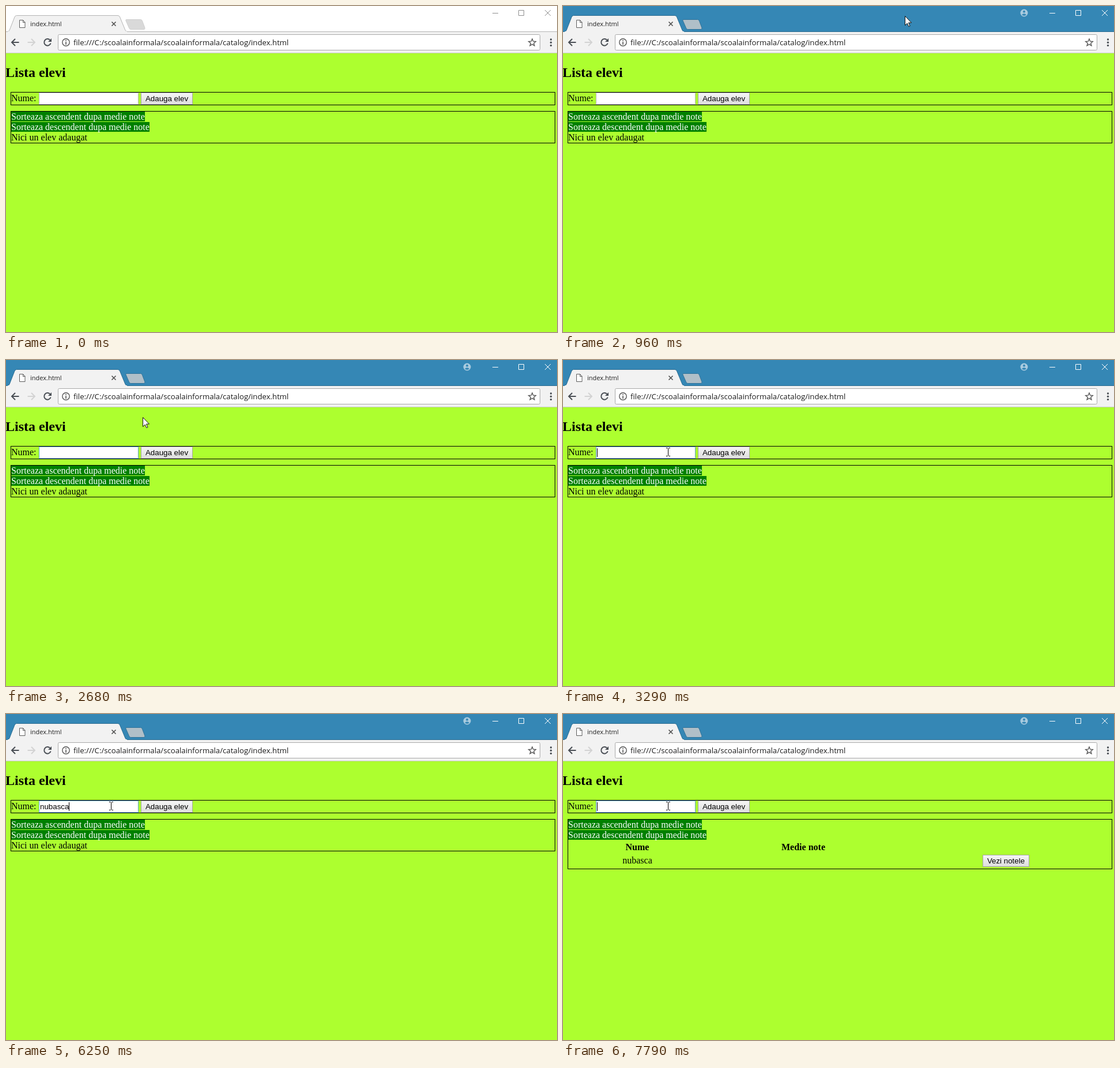
Recreate the animation shown at these times as an HTML page. Size 956 by 565 pixels, loop 8 s.

```html
<!DOCTYPE html>
<html lang="ro">
<head>
<meta charset="utf-8">
<title>Lista elevi</title>
<style>
  html, body { margin: 0; width: 100%; height: 100%; overflow: hidden; background: #adff2f; }
  svg { display: block; width: 956px; height: 565px; }
  text { white-space: pre; }
  .ui { font-family: "Open Sans", "Noto Sans", sans-serif; }
  .page { font: 16px "Liberation Serif", "Times New Roman", serif; }
  .form { font: 13.333px "Liberation Sans", Arial, sans-serif; }
  .mid { text-anchor: middle; }
  .bold { font-weight: bold; }
  .line { fill: none; stroke: #000; }
  .icon { fill: none; stroke: #4a4f55; stroke-width: 2; }
  .bar { fill: #fff; }
  .edge { stroke: #b4b4b4; }
  .plus { fill: #d9d9d9; stroke: #cfcfcf; }
  .win { fill: none; stroke: #8e8e8e; }
  .user { display: none; }
  .active .bar { fill: #3587b5; }
  .active .edge { stroke: #2b6c91; }
  .active .plus { fill: #b0bfc8; stroke: #2f7299; }
  .active .win { stroke: #fff; }
  .active .user { display: inline; }
</style>
</head>
<body>
<svg viewBox="0 0 956 565" xmlns="http://www.w3.org/2000/svg">
  <defs>
    <linearGradient id="face" x2="0" y2="1">
      <stop stop-color="#f6f6f6"/><stop offset="1" stop-color="#dddddd"/>
    </linearGradient>
  </defs>
  <rect width="956" height="565" fill="#adff2f"/>

  <g id="frame">
    <rect class="bar" width="956" height="45"/>
    <rect y="45" width="956" height="37" fill="#f2f2f2"/>
    <path class="edge" d="M0 44.5H956"/>
    <path class="edge" fill="#f2f2f2" d="M2 44.5Q5 44.5 6 42L15 19Q16 16.5 18.500 16.500H194Q196.500 16.500 197.500 19L207 42Q208 44.500 211 44.500"/>
    <path d="M3 44.5H210" stroke="#f2f2f2"/>
    <path class="plus" d="M209 23.500H233.500Q235.500 23.500 236.300 25.500L241 38Q241.500 40.500 239 40.500H216.500Q214.500 40.500 213.700 38.500L208 25.500Q207.200 23.500 209 23.500Z"/>
    <path class="win" d="M844 12.5H854M889.500 7.500H898.500V16.500H889.500ZM935 7L945 17M945 7L935 17"/>
    <g class="user">
      <circle cx="800" cy="12" r="6.500" fill="#a9cbdf"/>
      <circle cx="800" cy="9.700" r="2" fill="#3587b5"/>
      <path d="M796 15.200Q800 11.200 804 15.200Q800 18.600 796 15.200Z" fill="#3587b5"/>
    </g>
  </g>

  <path id="favicon" d="M23.500 24.500H29.500L33 28V37.500H23.500ZM29.500 24.500V28.500H33" fill="#fff" stroke="#5c5c5c"/>
  <text class="ui" x="42" y="35" font-size="11" fill="#222">index.html</text>
  <path d="M183.500 27.500L190.500 34.500M190.500 27.500L183.500 34.500" stroke="#505050" stroke-width="1.600"/>

  <path d="M0 81.500H956" stroke="#c6ccbd"/>
  <path class="icon" d="M22.500 63H10.500M16 57L10 63L16 69"/>
  <path class="icon" style="stroke:#d3d3d3" d="M37.500 63H49.500M44 57L50 63L44 69"/>
  <g id="reload">
    <path class="icon" d="M76.300 58.900A5.800 5.800 0 1 0 77.600 64.500"/>
    <path d="M79 56V62H73Z" fill="#4a4f55"/>
  </g>
  <path id="stop" class="icon" d="M66.500 57.500L77.500 68.500M77.500 57.500L66.500 68.500"/>
  <rect x="90.500" y="49.500" width="836" height="27" rx="2" fill="#fff" stroke="#a9a9a9"/>
  <circle cx="104" cy="63" r="6.200" fill="none" stroke="#555" stroke-width="1.400"/>
  <path d="M104 62V67M104 59V60.700" stroke="#555" stroke-width="1.600"/>
  <text class="ui" x="117" y="68" font-size="13.200" fill="#1c1c1c">file:///C:/scoalainformala/scoalainformala/catalog/index.html</text>
  <path d="M913 57L914.700 61.200L919.200 61.500L915.700 64.400L916.900 68.800L913 66.400L909.100 68.800L910.300 64.400L906.800 61.500L911.300 61.200Z" fill="none" stroke="#555" stroke-width="1.400"/>
  <g fill="#4a4f55">
    <circle cx="945.500" cy="58" r="1.700"/><circle cx="945.500" cy="63.200" r="1.700"/><circle cx="945.500" cy="68.400" r="1.700"/>
  </g>

  <g class="page">
    <text class="bold" x="-1" y="123" font-size="24">Lista elevi</text>
    <rect class="line" x="8.500" y="149.500" width="944" height="22"/>
    <text x="9" y="165">Nume:</text>
    <rect id="panel" class="line" x="8.500" y="182.500" width="944" height="55"/>
    <path d="M9 183H241V200H9ZM9 201H249V218H9Z" fill="#008000"/>
    <text x="9" y="197" fill="#fff">Sorteaza ascendent dupa medie note</text>
    <text x="9" y="215" fill="#fff">Sorteaza descendent dupa medie note</text>
    <text id="empty" x="9" y="233">Nici un elev adaugat</text>
    <g id="table" class="mid">
      <text class="bold" x="129" y="236">Nume</text>
      <text class="bold" x="417" y="236">Medie note</text>
      <text id="pupil" x="129" y="259"></text>
      <g class="form">
        <rect x="728.500" y="244.500" width="80" height="20" fill="url(#face)" stroke="#a5a5a5"/>
        <text x="768.500" y="259">Vezi notele</text>
      </g>
    </g>
  </g>

  <g class="form">
    <rect id="field" x="57.500" y="150.500" width="172" height="20" fill="#fff"/>
    <text id="typed" x="59" y="165"></text>
    <rect id="caret" y="153" width="1" height="15"/>
    <rect x="234.500" y="150.500" width="89" height="20" fill="url(#face)" stroke="#a5a5a5"/>
    <text class="mid" x="279" y="165">Adauga elev</text>
  </g>

  <path id="arrow" d="M.5 .5V16.500L4.200 13L6.800 18.500L9 17.500L6.500 12H11.500Z" fill="#fff" stroke="#111"/>
  <path id="beam" class="line" d="M179 152.500H181.500M183.500 152.500H186M182.500 153V166M179 166.500H181.500M183.500 166.500H186"/>
</svg>
<script>
const LOOP = 8000;
const NAME = "nubasca";
const el = id => document.getElementById(id);
const ui = Object.fromEntries([...document.querySelectorAll("[id]")].map(e => [e.id, e]));

// Pointer stops: time, x, y
const PATH = [
  [120, 744, 440], [180, 694, 330], [230, 649, 235],
  [420, 610, 95], [500, 590, 30], [580, 594, 13], [810, 593, 17],
  [2530, 490, 43], [2600, 350, 76], [2680, 237, 99],
  [2830, 225, 110], [2910, 209, 124], [2990, 196, 136], [3140, 188, 147]
];
const KEYS = [4240, 4460, 4940, 5090, 5170, 5400, 6250];
const CARET = [[1050, 1510], [2060, 2600], [3220, 3990], [4240, 5930], [6250, 6800], [7260, LOOP]];
const BEAM = 3220, ADDED = 7790;

const within = (t, from, to) => t >= from && t < to;
const show = (node, on) => node.setAttribute("visibility", on ? "visible" : "hidden");

function render(t) {
  ui.frame.classList.toggle("active", t >= 960);
  ui.field.setAttribute("stroke", t >= 1050 ? "#5a9fd4" : "#b5b5b5");
  show(ui.favicon, !within(t, 1980, 2060));
  show(ui.reload, !within(t, 1980, 2140));
  show(ui.stop, within(t, 1980, 2140));

  const added = t >= ADDED;
  ui.typed.textContent = added ? "" : NAME.slice(0, KEYS.filter(k => k <= t).length);
  const width = ui.typed.textContent ? ui.typed.getComputedTextLength() : 0;
  ui.caret.setAttribute("x", 59 + Math.round(width));
  show(ui.caret, CARET.some(([from, to]) => within(t, from, to)));

  show(ui.empty, !added);
  show(ui.table, added);
  ui.panel.setAttribute("height", added ? 86 : 55);

  const stop = PATH.filter(p => p[0] <= t).pop();
  show(ui.arrow, stop && t < BEAM);
  if (stop) ui.arrow.setAttribute("transform", `translate(${stop[1]} ${stop[2]})`);
  show(ui.beam, t >= BEAM);
}

el("pupil").textContent = NAME;
const start = performance.now();
function tick() {
  render((performance.now() - start) % LOOP);
  requestAnimationFrame(tick);
}
tick();
</script>
</body>
</html>
```
